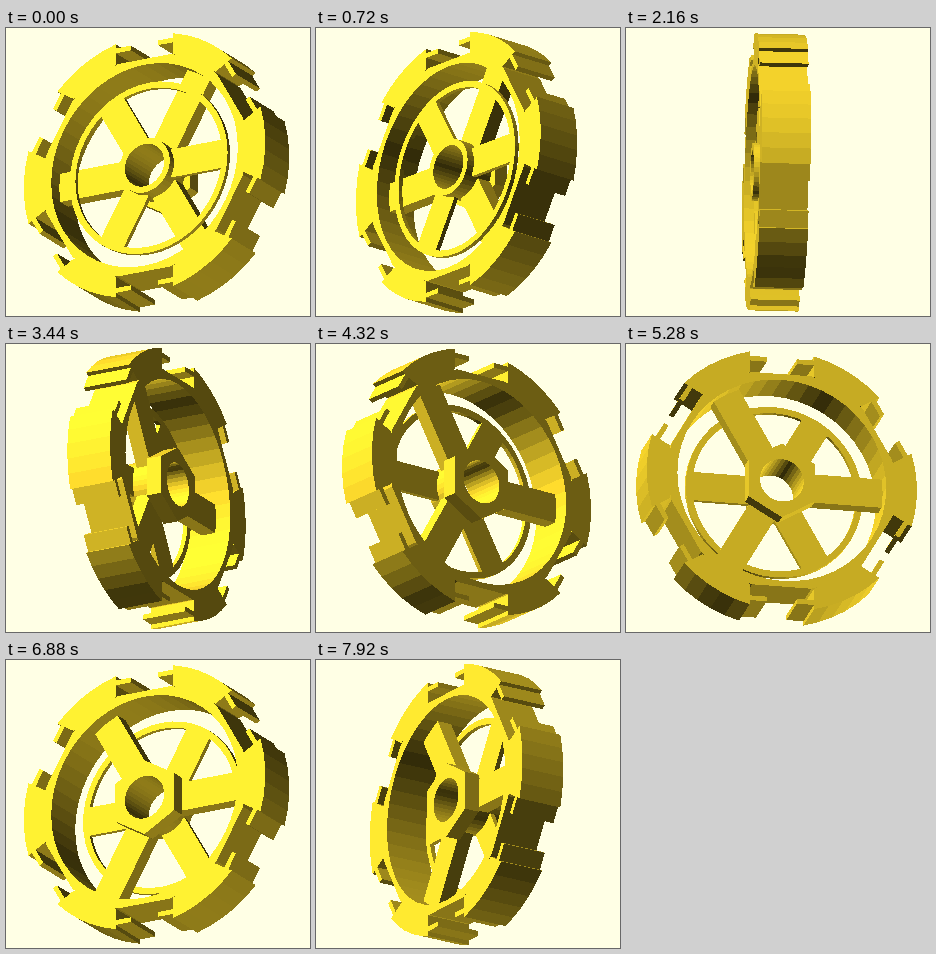
Recreate the animation shown at these times as an HTML page with a canvas. Size 304 by 288 pixels, loop 8 s.

```html
<!DOCTYPE html>
<html lang="en">
<head>
<meta charset="utf-8">
<title>Turning wheel</title>
<style>
html, body { margin: 0; width: 100%; height: 100%; overflow: hidden; background: #ffffe5; }
canvas { display: block; width: 304px; height: 288px; }
</style>
</head>
<body>
<canvas id="stage" width="304" height="288"></canvas>
<script>
const W = 304, H = 288, CX = 150.5, CY = 144.5;
const STEP = 80, LOOP = 8000;
const TURN = 180 / 86;          // degrees per step
const START = 90 - 29 * TURN;
const rad = d => d * Math.PI / 180;
const TILT = rad(20), SIN_T = Math.sin(TILT), COS_T = Math.cos(TILT);
const BASE = [249, 215, 44], AMBIENT = 0.2;
const HALF = 24.5;              // half the wheel's thickness

const ctx = document.getElementById('stage').getContext('2d');
const img = ctx.createImageData(W, H);
const pix = new Uint32Array(img.data.buffer);
const depth = new Float32Array(W * H);
const pack = (r, g, b) => (255 << 24 | b << 16 | g << 8 | r) >>> 0;
const PAPER = pack(255, 255, 229);

// ---- model: convex faces, counter-clockwise seen from outside ----
const faces = [];
const polar = (r, deg) => [r * Math.cos(rad(deg)), r * Math.sin(rad(deg))];

function prism(pts, w0, w1, skip = []) {
  const at = w => pts.map(p => [p[0], p[1], w]);
  const lo = at(w0), hi = at(w1), n = pts.length;
  faces.push(hi, lo.slice().reverse());
  for (let i = 0; i < n; i++) {
    const j = (i + 1) % n;
    if (!skip.includes(i)) faces.push([lo[i], lo[j], hi[j], hi[i]]);
  }
}

function ring(inner, outer, n, w0, w1) {
  const out = typeof outer === 'function' ? outer : () => outer;
  for (let i = 0; i < n; i++) {
    const a = 360 * i / n, b = 360 * (i + 1) / n;
    prism([polar(inner, a), polar(out(a), a), polar(out(b), b), polar(inner, b)], w0, w1, [0, 2]);
  }
}

// radius of a hexagon whose sides face the directions shift + 60k
const hexagon = (apothem, shift) => a => {
  const d = ((a - shift + 390) % 60) - 30;
  return apothem / Math.cos(rad(d));
};

function bar(x0, x1, y0, y1, deg, w0, w1) {
  const c = Math.cos(rad(deg)), s = Math.sin(rad(deg));
  const pts = [[x0, y0], [x1, y0], [x1, y1], [x0, y1]];
  prism(pts.map(([x, y]) => [x * c - y * s, x * s + y * c]), w0, w1);
}

// block between two slots; its sides run parallel to the slot axes
function block(deg) {
  const pts = [polar(117.5, deg - 13.7)];
  for (let i = 0; i <= 5; i++) pts.push(polar(138.5, deg - 16.2 + 32.4 * i / 5));
  pts.push(polar(117.5, deg + 13.7));
  prism(pts, -HALF, HALF);
}

function build() {
  const flats = hexagon(113, 30);
  ring(107, a => Math.min(117, flats(a)), 48, -HALF, HALF);
  ring(84, 90.5, 48, 11, 16);
  ring(22.5, 29, 36, -HALF, HALF);
  ring(22.5, hexagon(34, 0), 36, -HALF, -8);
  for (let a = 0; a < 360; a += 60) {
    block(a);
    bar(125, 130, 15.5, 36, a + 30, -HALF, HALF);
    bar(125, 130, -36, -15.5, a + 30, -HALF, HALF);
  }
  for (let a = 0; a < 360; a += 120) {
    bar(26, 87, -15, 15, a, 11, 16);
    bar(26, 107, -15, 15, a + 60, -8, 8);
  }
}

// ---- drawing ----
function shade(nx, ny, nz) {
  const light = Math.abs(-nx + ny + nz) / Math.sqrt(3);   // two opposite lamps
  const k = AMBIENT + light;
  return pack(...BASE.map(c => Math.min(255, Math.round(c * k))));
}

function triangle(a, b, c, color) {
  const area = (b[0] - a[0]) * (c[1] - a[1]) - (b[1] - a[1]) * (c[0] - a[0]);
  if (Math.abs(area) < 1e-6) return;
  const x0 = Math.max(0, Math.ceil(Math.min(a[0], b[0], c[0]) - 0.5));
  const x1 = Math.min(W - 1, Math.floor(Math.max(a[0], b[0], c[0]) - 0.5));
  const y0 = Math.max(0, Math.ceil(Math.min(a[1], b[1], c[1]) - 0.5));
  const y1 = Math.min(H - 1, Math.floor(Math.max(a[1], b[1], c[1]) - 0.5));
  for (let y = y0; y <= y1; y++) {
    for (let x = x0; x <= x1; x++) {
      const px = x + 0.5, py = y + 0.5;
      const u = ((b[0] - px) * (c[1] - py) - (b[1] - py) * (c[0] - px)) / area;
      const v = ((c[0] - px) * (a[1] - py) - (c[1] - py) * (a[0] - px)) / area;
      const w = 1 - u - v;
      if (u < -1e-6 || v < -1e-6 || w < -1e-6) continue;
      const z = u * a[2] + v * b[2] + w * c[2], i = y * W + x;
      if (z > depth[i]) { depth[i] = z; pix[i] = color; }
    }
  }
}

function draw(step) {
  const psi = rad(START + step * TURN), c = Math.cos(psi), s = Math.sin(psi);
  const view = ([u, v, w]) => {
    const x = u * c - w * s, z = u * s + w * c;
    return [x, v * COS_T + z * SIN_T, z * COS_T - v * SIN_T];
  };
  pix.fill(PAPER);
  depth.fill(-1e9);
  for (const face of faces) {
    const p = face.map(view), [a, b, d] = p;
    const e = [0, 1, 2].map(i => b[i] - a[i]), f = [0, 1, 2].map(i => d[i] - a[i]);
    const nx = e[1] * f[2] - e[2] * f[1];
    const ny = e[2] * f[0] - e[0] * f[2];
    const nz = e[0] * f[1] - e[1] * f[0];
    if (nz <= 0) continue;
    const len = Math.hypot(nx, ny, nz);
    const color = shade(nx / len, ny / len, nz / len);
    const q = p.map(([x, y, z]) => [CX + x, CY - y, z]);
    for (let i = 1; i < q.length - 1; i++) triangle(q[0], q[i], q[i + 1], color);
  }
  ctx.putImageData(img, 0, 0);
}

build();
let shown = -1;
const begin = performance.now();
function tick() {
  const step = Math.floor(((performance.now() - begin) % LOOP) / STEP);
  if (step !== shown) draw(shown = step);
  requestAnimationFrame(tick);
}
tick();
</script>
</body>
</html>
```
